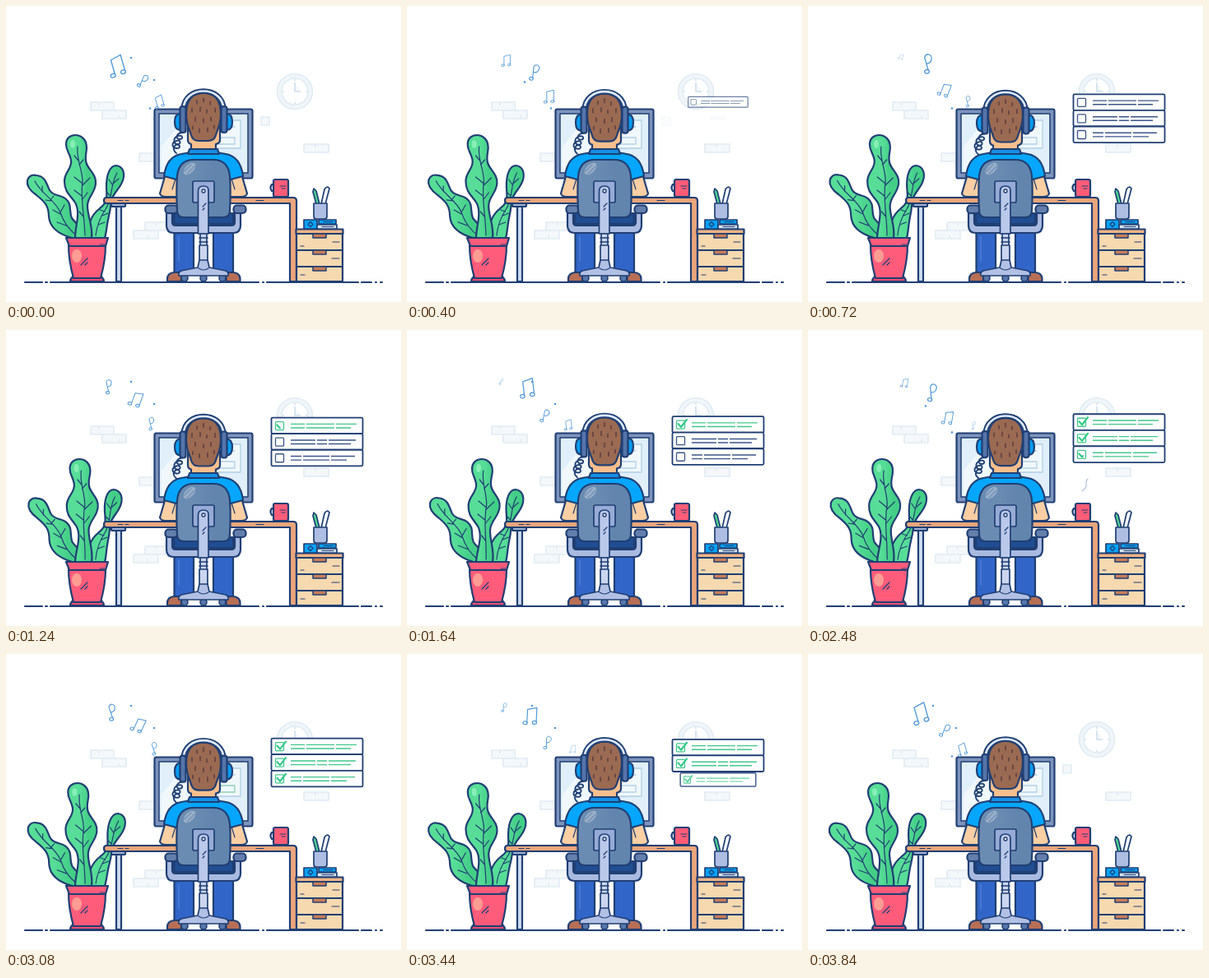
Recreate the animation shown at these times as an HTML page. Size 480 by 360 pixels, loop 3.88 s.

```html
<!DOCTYPE html>
<html lang="en">
<head>
<meta charset="utf-8">
<title>Working to music</title>
<style>
  html, body { margin: 0; width: 100%; height: 100%; overflow: hidden; background: #fff; }
  svg { display: block; width: 480px; height: 360px; }
  .ink { stroke: #203f73; stroke-width: 2.2; stroke-linejoin: round; stroke-linecap: round; fill: none; }
  .thin { stroke-width: 1.2; fill: none; }
  .bare { stroke: none; }
  .wall { fill: #f4f8fb; stroke: #e1ecf3; stroke-width: 1.6; stroke-linejoin: round; }
  .note { fill: none; stroke: #559bd8; stroke-width: 1.4; stroke-linecap: round; stroke-linejoin: round; }
  .note * { vector-effect: non-scaling-stroke; }
</style>
</head>
<body>
<svg viewBox="0 0 480 360">
  <defs>
    <linearGradient id="leaf">
      <stop offset=".45" stop-color="#57dd97"/><stop offset=".75" stop-color="#43ce87"/>
    </linearGradient>
    <linearGradient id="back">
      <stop offset=".3" stop-color="#6b8cb2"/><stop offset=".7" stop-color="#6285ae"/>
    </linearGradient>
    <g id="double">
      <path d="M-5 8V-10L8 -13V7"/>
      <ellipse cx="-7.500" cy="9" rx="3" ry="2.300"/><ellipse cx="5.500" cy="8" rx="3" ry="2.300"/>
    </g>
    <g id="single">
      <path d="M0 9L-2 -8C0 -15 9 -11 6 -4C5 -1 2 0 0 0"/>
      <ellipse cx="-2" cy="10" rx="3" ry="2.400"/>
    </g>
  </defs>

  <g class="wall">
    <path d="M103 117h28v10h-28zM117 127h29v10h-29zM162 179h22v10h-22zM362 168h30v10h-30zM169 263h27v10h-27zM155 273h30v10h-30z"/>
    <path d="M113 117v4M138 137v-4M376 168v4M182 263v4M172 283v-4"/>
    <path id="brick" d="M310 135h10v10h-10z"/>
    <circle cx="351" cy="104" r="21.500" fill="#f0f6fa"/>
    <circle cx="351" cy="104" r="16" fill="#fff"/>
    <path d="M351 93v11h7M351 89v2M351 117v2M336 104h2M364 104h2" stroke="#cfdfeb"/>
  </g>

  <g class="ink">
    <path d="M23 336H44M48 336h2M54 336H307M312 336h1M317 336H428M432 336H444M449 336h1M455 336h2"/>

    <!-- plant -->
    <g id="leftLeaf">
      <path fill="url(#leaf)" d="M80 282C62 277 53 268 52 256C52 243 47 238 37 230C27 223 25 217 26 212C28 206 33 205 37 206C48 207 49 216 53 224C58 232 66 229 72 234C81 241 76 249 80 258C86 266 94 270 95 282Z"/>
      <path class="thin" d="M35 213C44 230 60 236 66 251Q72 269 87 280M44 226v-7M54 236l4-5M55 237l-7-1M66 251l5-9M66 253l-9-5M73 267l-11-4"/>
    </g>
    <g id="rightLeaf">
      <path fill="url(#leaf)" d="M102 282C98 266 104 254 114 246C125 238 122 230 122 219C122 206 126 194 134 194C142 195 145 203 142 212C139 222 130 227 128 237C127 247 126 252 124 260C122 270 122 276 120 282Z"/>
      <path class="thin" d="M135 203C126 218 130 235 121 247Q111 262 109 279M130 216l7-6M129 217l-4-6M127 231l-4-4M120 250l-6-2M117 255l7-3M112 266l8-3"/>
    </g>
    <g id="midLeaf">
      <path fill="url(#leaf)" d="M84 282C84 268 91 251 84 239C78 230 71 226 71 213C71 201 81 198 79 187C77 178 73 176 73 168C73 161 78 157 84 157C92 157 98 163 98 172C98 180 95 184 98 192C101 200 110 205 109 216C108 228 99 232 99 243C99 256 106 268 104 282Z"/>
      <path class="thin" d="M87 171C85 185 93 199 93 213C90 234 95 250 96 279M88 188l-5-6M89 193l5-6M93 216l-10-8M93 218l9-9M92 231l-9-7M93 235l6-8M94 256l-5-6"/>
      <ellipse class="bare" cx="81" cy="168" rx="3" ry="5" fill="#87efb6"/>
    </g>
    <path fill="#f94f73" d="M81 329h35q3 3 3 6h-41q0-3 3-6z"/>
    <path fill="#ff5c7c" d="M76 291H121C121 306 118 320 115 331H82C79 320 76 306 76 291Z"/>
    <path fill="#ff5c7c" d="M73 282H124L121 292H77Z"/>
    <ellipse class="bare" cx="86" cy="304" rx="6" ry="8" fill="#ff9c93"/>
    <path class="thin" d="M91 315l8-8M96 315l3-3M114 290h6"/>

    <!-- monitor -->
    <rect x="180.500" y="125.500" width="119" height="84" rx="2" fill="#7e94bd"/>
    <rect x="186" y="131" width="108" height="72" fill="#e0eff9" stroke-width="1.500"/>
    <path class="bare" fill="#f1f8fc" d="M189 171L220 133H232V201H189ZM256 139H285V173H256Z"/>
    <g stroke="#b3d0e6" stroke-width="1.300">
      <path d="M258 139h27v34h-27M264 147h14"/>
      <rect id="bar" x="256" y="160" width="22" height="8"/>
    </g>

    <!-- desk -->
    <path fill="#d0dcf1" d="M134 242h6v93h-6z"/>
    <rect x="128" y="239" width="17" height="5" rx="1" fill="#9fb1d8"/>
    <path fill="#eba67b" d="M122 233H349Q353 233 353 237V335H345V240H122Q119 240 119 236.500Q119 233 122 233Z"/>
    <path class="thin" d="M136 236.500h6M145 236.500h4M304 236.500h9"/>

    <!-- mug -->
    <path d="M326 217h-3q-3 4 0 8h3"/>
    <rect x="325" y="211" width="18" height="21" rx="2" fill="#ff5c78"/>
    <path class="thin" d="M333 219h7M335 222h4"/>
    <path id="steam" class="thin" stroke="#b4c8df" d="M333 196q6-4 5-9q-1-3 2-6"/>

    <!-- drawers -->
    <path fill="#f7d9b0" d="M353 276h56v59h-56zM353 297h56M353 317h56"/>
    <rect x="352.500" y="271.500" width="57" height="5.500" fill="#efb385"/>
    <path fill="#c87d58" stroke-width="1.500" d="M373 277h16v5h-16zM373 297h16v5h-16zM373 317h16v5h-16z"/>
    <path class="thin" d="M397 287h8M358 292h4M396 307h9M358 327h5"/>

    <!-- books and pens -->
    <g stroke-width="1.700">
      <path fill="#4ed492" d="M377 241l-4-15 1-4 3 3 4 16z"/>
      <path fill="#f4f7ff" d="M383 241l4-18q3-5 6-1l-5 19z"/>
      <path fill="#aebde2" d="M374 240h16v16q0 3-3 3h-10q-3 0-3-3z"/>
      <path fill="#05a3f8" d="M380 260h21v5h-21zM362 260h16v11h-16z"/>
      <path fill="#d8e6f6" d="M378 266h24v5h-24z"/>
      <path class="thin" d="M367 265.500l3-3 3 3-3 3zM386 262.500h11M384 268.500h14"/>
    </g>

    <!-- legs and shoes -->
    <path fill="#3166c8" d="M204.500 272h23.500v54h-23.500zM252 272h24v54h-24z"/>
    <path class="thin" stroke="#5485da" d="M210 280v30"/>
    <path fill="#b86f55" d="M196 332q0-7 8-8h9v11h-17zM284.500 332q0-7-8-8h-9v11h17z"/>

    <!-- body -->
    <path fill="#fbcfa3" d="M194 204L187 228Q188 232 194 232H209V206ZM286 204L293 228Q292 232 286 232H271V206Z"/>
    <path class="thin" d="M206 210l-4 13M274 210l4 13"/>
    <path fill="#05a6fb" d="M192 207Q195 183 213 180L224 178H256L267 180Q285 183 288 207L273 211H207Z"/>
    <g id="head">
      <path fill="#f8bf8d" d="M221 145V163Q221 167 225 168V176H255V168Q260 167 260 163V145Z"/>
      <path fill="#9b6a52" d="M219 131C219 114 227 106 240 106C253 106 261 114 261 131C261 147 256 151 255 157Q253 164 246 164H234Q227 164 225 157C224 151 219 147 219 131Z"/>
      <path class="thin" stroke="#4b333b" d="M240 112v5M232 115v4M248 116v4M226 124v5M236 123v5M244 126v4M254 124v5M230 135v5M240 137v5M249 135v5M227 146v4M235 149v5M245 148v5M253 145v4"/>
      <path d="M215.500 126C216 96 264 96 264.500 126" stroke-width="6.500"/>
      <path d="M215.500 126C216 96 264 96 264.500 126" stroke="#dfeaff" stroke-width="2.600"/>
      <path fill="#089cf0" d="M212 131q-7 0-7 10t7 10zM268 131q7 0 7 10t-7 10z"/>
      <rect x="211.500" y="122" width="7" height="32" rx="3" fill="#5474aa"/>
      <rect x="261.500" y="122" width="7" height="32" rx="3" fill="#5474aa"/>
      <path stroke-width="1.900" d="M214 154c-8 1-8 8-3 8s4-6-2-4-6 9-1 10 5-6-1-4-6 8 0 9 5-6-1-4q-5 5 1 10"/>
    </g>
    <path fill="#168fe5" d="M223 174H257L259 180H221Z"/>

    <!-- chair -->
    <path fill="#214d92" d="M204 252H276V265H204Z"/>
    <path fill="#a9bae1" d="M195 250h7v13q0 4 4 4H274q4 0 4-4V250h7v17q0 9-9 9H204q-9 0-9-9z"/>
    <rect x="193.500" y="242.500" width="15" height="9.500" rx="4" fill="#647fac"/>
    <rect x="276.500" y="242.500" width="15" height="9.500" rx="4" fill="#647fac"/>
    <path fill="url(#back)" d="M208 249C207 230 207 220 208 207Q210 187 228 187H252Q270 187 272 207C273 220 273 230 272 249Q272 257 264 257H216Q208 257 208 249Z"/>
    <ellipse class="bare" cx="223" cy="198" rx="9" ry="5" fill="#9aafc9" transform="rotate(-45 223 198)"/>
    <path class="thin" stroke="#6f8fb5" d="M217 201l8-8M220 204l9-9"/>
    <rect x="227" y="213" width="26" height="26" rx="2" fill="#96abd6" stroke-width="1.700"/>
    <path fill="#bac8ea" stroke-width="1.700" d="M233.500 277V225q0-6 6.500-6t6 6V277z"/>
    <circle cx="240" cy="225" r="2" fill="#eef3ff" stroke-width="1.300"/>
    <path class="thin" d="M239 244l4-4M239 248l2-2"/>
    <path fill="#cbd5ef" stroke-width="1.700" d="M236 277h8v14h-8zM235 291h10v19h-10zM235 282h10M235 287h10"/>
    <g fill="#5877aa" stroke-width="1.600">
      <circle cx="217" cy="331" r="4"/><circle cx="240" cy="331" r="4"/><circle cx="263" cy="331" r="4"/>
    </g>
    <path fill="#b1c0e4" stroke-width="1.700" d="M235 309h10l2 9 20 4q4 2 3 6h-60q-1-4 3-6l20-4z"/>
    <path class="thin" d="M234 319q6 4 12 0"/>
  </g>

  <g id="list" class="ink"></g>
  <g id="notes"></g>
</svg>
<script>
const LOOP = 3880, BEAT = LOOP / 2, TAU = Math.PI * 2;
const $ = id => document.getElementById(id);
const clamp = v => Math.max(0, Math.min(1, v));
const ease = v => (v = clamp(v)) * v * (3 - 2 * v);
const mod = (a, b) => (a % b + b) % b;

function add(parent, tag, attrs) {
  const el = document.createElementNS('http://www.w3.org/2000/svg', tag);
  for (const key in attrs) el.setAttribute(key, attrs[key]);
  return parent.appendChild(el);
}
const set = (el, key, value) => el.setAttribute(key, value);

// Checklist rows, each ticked in turn
const rows = ['17 2 34 2 25 2', '30 2 12 2 33 2', '13 2 32 2 29 2'].map((dash, i) => {
  const g = add($('list'), 'g');
  const y = 102.5 + i * 19.6;
  add(g, 'rect', { x: 322.5, y, width: 111, height: 19.6, rx: 1.5, fill: '#fff', 'stroke-width': 1.8 });
  const box = add(g, 'rect', { x: 327.5, y: y + 5, width: 10, height: 10, rx: 1, 'stroke-width': 1.3 });
  const d = `M346 ${y + 7.8}H${[426, 425, 426][i]}M346 ${y + 12.4}H${[419, 419, 414][i]}`;
  const style = { d, 'stroke-width': 1.4, 'stroke-dasharray': dash, 'stroke-linecap': 'butt' };
  const lines = add(g, 'path', style);
  const tick = add(g, 'path', { d: `M329.500 ${y + 9}l3.500 4 7-9`, stroke: '#35c98a', 'stroke-width': 2.2, pathLength: 1 });
  return { g, y, box, lines, tick, start: 1150 + i * 610 };
});

// Age in beats, x, y, scale
const flight = [
  [-.3, 207, 116, .3], [-.13, 194, 116, .55], [0, 186, 117, .62], [.14, 176, 114, .65],
  [.37, 166, 103, .68], [.5, 166, 91, .7], [.64, 158, 85, .75], [.87, 145, 70, .95],
  [1, 135, 74, 1], [1.14, 124, 69, .7], [1.37, 113, 62, .28], [1.5, 110, 59, 0]
];
const notes = [0, 1, 2, 3].map(k => {
  const g = add($('notes'), 'g', { class: 'note' });
  add(g, 'use', { href: k % 2 ? '#single' : '#double' });
  return g;
});

// x, y, first beat phase, visible length
const sparks = [[152, 63, .52, .58], [180, 90, .55, .53], [175, 124.5, .95, .5], [143, 92.5, .18, .16]]
  .map(([x, y, from, length]) => ({
    el: add($('notes'), 'circle', { cx: x, cy: y, r: 1.3, fill: '#559bd8' }), from, length
  }));

function placeNote(g, age) {
  const i = flight.findIndex(p => p[0] > age);
  set(g, 'visibility', i < 1 ? 'hidden' : 'visible');
  if (i < 1) return;
  const a = flight[i - 1], b = flight[i], f = (age - a[0]) / (b[0] - a[0]);
  const [x, y, scale] = [1, 2, 3].map(n => a[n] + (b[n] - a[n]) * f);
  const angle = 6 - 22 * Math.cos(TAU * age);
  set(g, 'transform', `translate(${x} ${y}) rotate(${angle}) scale(${scale})`);
  set(g, 'opacity', clamp((age + .3) * 8) * clamp((1.5 - age) * 5));
}

const sway = (id, dx, height) =>
  set($(id), 'transform', `matrix(1 0 ${-dx / height} 1 ${dx / height * 282} 0)`);

function draw(t) {
  const turn = TAU * t / LOOP, beat = t / BEAT;
  const swing = 1 - Math.cos(turn);

  sway('midLeaf', 3.5 * swing, 125);
  sway('rightLeaf', -2.5 * Math.sin(turn - .2) - .5, 88);
  set($('leftLeaf'), 'transform', `rotate(${swing * .9} 88 282)`);
  set($('head'), 'transform', `translate(0 ${.9 * (1 - Math.cos(TAU * beat))})`);

  notes.forEach((g, k) => placeNote(g, mod(beat - k / 2 + .3, 2) - .3));
  sparks.forEach(s => {
    const p = mod(beat - s.from, 1) / s.length;
    set(s.el, 'opacity', p < 1 ? clamp(5 * Math.sin(Math.PI * p)) : 0);
  });

  set($('list'), 'transform', `translate(0 ${2.2 + 2.6 * Math.sin(turn + .35)})`);
  rows.forEach((row, i) => {
    const shown = ease((t - 250 - i * 90) / 250) * (1 - ease((t - 3380 - (2 - i) * 70) / 230));
    const cy = row.y + 10;
    set(row.g, 'transform', `translate(378 ${cy}) scale(${shown}) translate(-378 ${-cy})`);
    set(row.g, 'opacity', shown);
    const done = t > row.start, color = done ? '#43c78d' : '#3c5688';
    set(row.lines, 'stroke', color);
    set(row.box, 'stroke', color);
    set(row.tick, 'visibility', done ? 'visible' : 'hidden');
    set(row.tick, 'stroke-dasharray', `${ease((t - row.start) / 250)} 2`);
  });

  set($('brick'), 'opacity', 1 - ease((t - 250) / 250) + ease((t - 3450) / 250));
  set($('bar'), 'stroke', t > 2600 && t < 3400 ? '#8fd0b5' : '#b3d0e6');
  const puff = (t - 2250) / 500;
  set($('steam'), 'opacity', puff > 0 && puff < 1 ? Math.sin(Math.PI * puff) : 0);
}

function frame() {
  draw(performance.now() % LOOP);
  requestAnimationFrame(frame);
}
frame();
</script>
</body>
</html>
```
